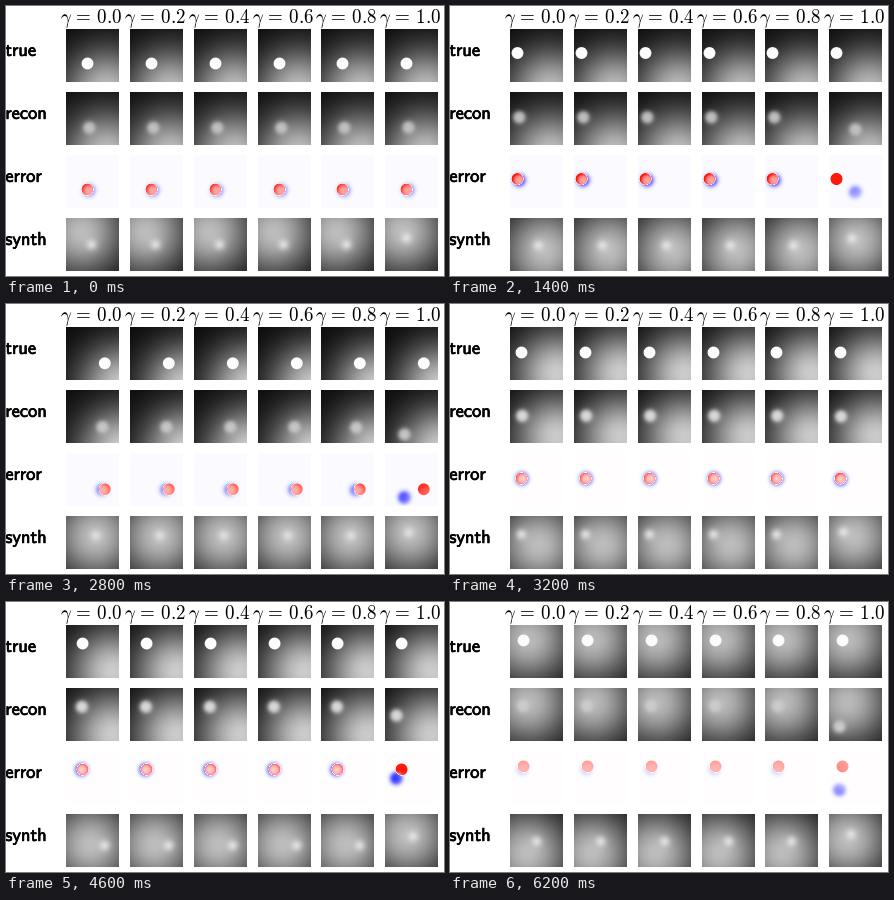
Animation of 438 by 270 pixels, one loop 6400 ms. Source, as a matplotlib script:

```python
import numpy as np
import matplotlib.pyplot as plt
from matplotlib.animation import FuncAnimation
from matplotlib.patheffects import withStroke

plt.rcParams["mathtext.fontset"] = "cm"

W, H, PANEL = 438, 270, 53
COLUMNS = [60, 124, 188, 252, 315, 379]
ROWS = [23, 86, 149, 212]
CLIP_LENGTH = 8
RADIUS = 5.9
gy, gx = np.mgrid[0:PANEL, 0:PANEL] + 0.0

# Each clip: a ball gliding under a fixed light, its reconstruction,
# and a synthesised variant given at the clip's start, middle and end.
CLIPS = [
    dict(start=(21, 34), speed=(-2.0, -1.5), light=(40, 61), level=0.71,
         lag=0.9, peak=0.76, bias=0.008, stuck=((23, 35), (26, 37)),
         ball=[(25, 26), (27, 27), (28, 27)], glow=[(15, 14), (27, 27), (34, 32)]),
    dict(start=(22.7, 41.2), speed=(2.6, -0.9), light=(55, 59), level=0.76,
         lag=0.9, peak=0.78, bias=0.008, stuck=((21, 43), (19, 44)),
         ball=[(26, 26), (28, 22), (30, 18)], glow=[(22, 34), (26, 25), (30, 18)]),
    dict(start=(11, 25), speed=(-2.3, -1.0), light=(46, 46), level=0.77,
         lag=0.3, peak=0.86, bias=-0.004, stuck=((11.5, 26), (11, 27)),
         ball=[(11, 18), (26, 25), (38, 31)], glow=[(28, 28), (26, 28), (24, 30)]),
    dict(start=(7.8, 34.2), speed=(0.75, -2.75), light=(18, 14), level=0.7,
         lag=0.9, peak=0.8, bias=-0.003, stuck=((9, 37), (10, 38)),
         ball=[(28, 25), (27, 26), (26, 27)], glow=[(34, 18), (27, 27), (17, 38)]),
]


def distance(point):
    return np.hypot(gx - point[0], gy - point[1])


def lit(light, level, spread=30):
    return 0.03 + level * np.exp(-(distance(light) / spread) ** 2 / 2)


def position(clip, t):
    """Straight flight that rebounds from the left wall."""
    (x, y), (vx, vy) = clip["start"], clip["speed"]
    return np.array([5.5 + abs(x - 5.5 + vx * t), y + vy * t])


def blend(base, value, mask):
    return base + (value - base) * mask


def soft_disc(point, size, softness):
    return 1 / (1 + np.exp((distance(point) - size) / softness))


def along(points, k):
    xs, ys = zip(*points)
    stops = (0, (CLIP_LENGTH - 1) / 2, CLIP_LENGTH - 1)
    return np.array([np.interp(k, stops, xs), np.interp(k, stops, ys)])


def recon_position(clip, k, column):
    if column == 5:
        first, last = map(np.array, clip["stuck"])
        return first + (last - first) * min(k / 3, 1)
    lag = clip["lag"]
    if column == 4:
        lag += 1.1 * np.sin(np.pi * k / 7) * (lag > 0.5)
    return position(clip, k - lag)


def synth_panel(clip, k, column):
    ball, glow = along(clip["ball"], k), along(clip["glow"], k)
    if column == 5:
        ball = 0.5 * ball + (8.5, 6.5)
        glow = 0.5 * glow + (10, 6)
    peak = 0.84 + 0.05 * abs(k - 3.5) / 3.5
    return blend(lit(glow, 0.71), peak, soft_disc(ball, 4.2, 1.8))


def grey(values):
    return np.repeat(np.clip(values, 0, 1)[..., None], 3, axis=2)


def signed(values):
    """White at zero, red above it and blue below."""
    v = np.clip(values / 0.6, -1, 1)
    red = 1 - 0.9 * np.clip(-v, 0, 1)
    blue = 1 - 0.95 * np.clip(v, 0, 1)
    return np.dstack([red, 1 - 0.9 * abs(v), blue])


def paint(frame):
    clip, k = CLIPS[frame // CLIP_LENGTH], frame % CLIP_LENGTH
    canvas = np.ones((H, W, 3))
    background = lit(clip["light"], clip["level"])
    disc = np.clip(RADIUS + 0.5 - distance(position(clip, k)), 0, 1)
    true = blend(background, 0.99, disc)
    for column, left in enumerate(COLUMNS):
        spot = soft_disc(recon_position(clip, k, column), 5.9, 1.3)
        recon = blend(background + clip["bias"], clip["peak"], spot)
        panels = [grey(true), grey(recon), signed(true - recon),
                  grey(synth_panel(clip, k, column))]
        for top, panel in zip(ROWS, panels):
            canvas[top:top + PANEL, left:left + PANEL] = panel
    return canvas


fig = plt.figure(figsize=(W / 72, H / 72), dpi=72, facecolor="white")
picture = fig.figimage(paint(0), origin="upper")

for i, left in enumerate(COLUMNS):
    fig.text((left + 25) / W, 1 - 17.5 / H, rf"$\gamma\,=\,{i / 5:.1f}$",
             size=19, ha="center", va="baseline")

bold = [withStroke(linewidth=0.7, foreground="black")]
for top, name in zip(ROWS, ["true", "recon", "error", "synth"]):
    fig.text(-0.7 / W, 1 - (top + 27) / H, rf"$\mathsf{{{name}}}$",
             size=18.5, ha="left", va="baseline", path_effects=bold)


def update(frame):
    picture.set_data(paint(frame))
    return [picture]


animation = FuncAnimation(fig, update, frames=len(CLIPS) * CLIP_LENGTH,
                          interval=200, repeat=True, repeat_delay=0)
plt.show()
```
